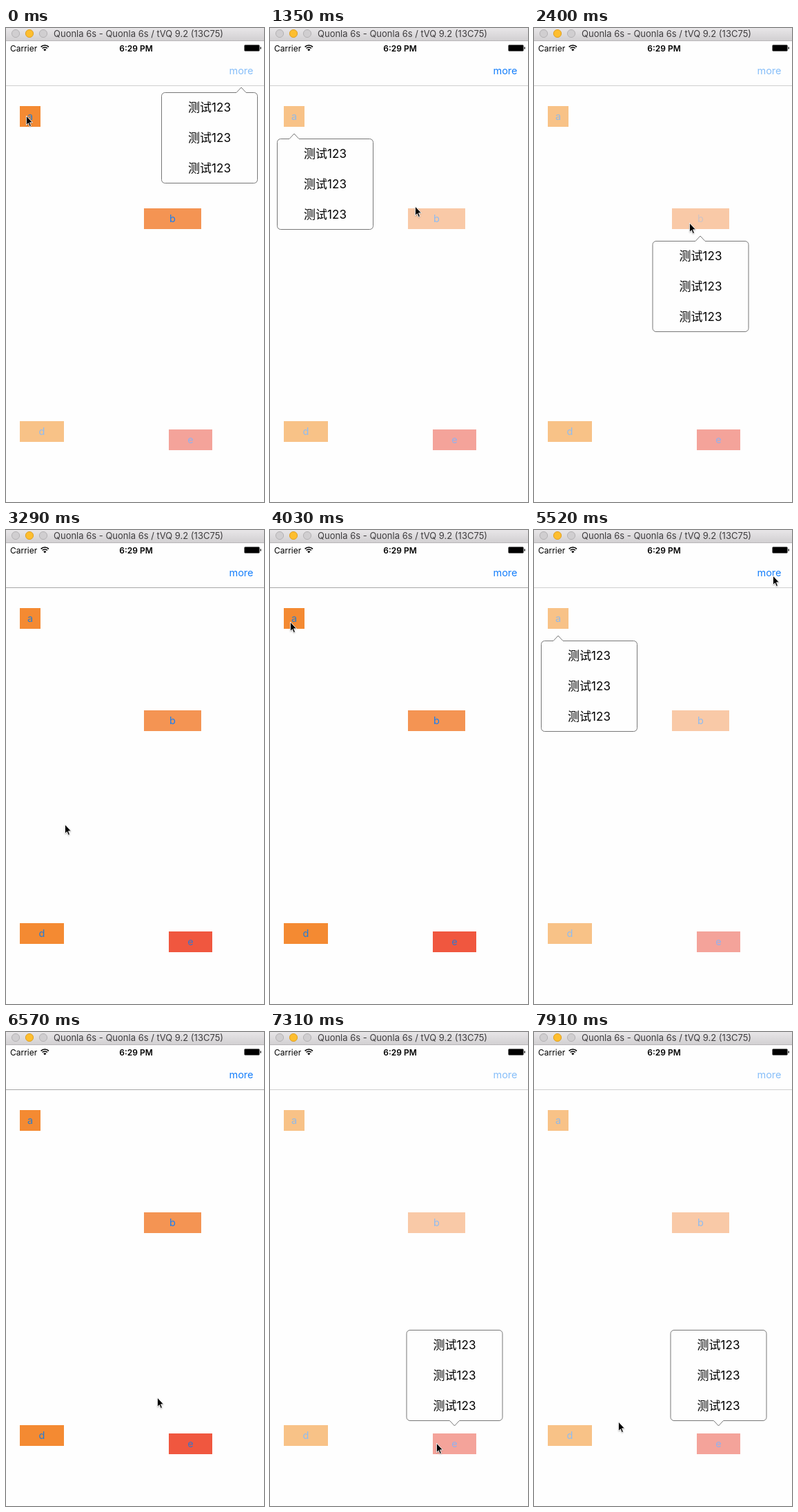
Animation, 374 px wide and 686 px high, one loop 8 s. Source, as an HTML page with a canvas:

```html
<!DOCTYPE html>
<html lang="en">
<head>
<meta charset="utf-8">
<title>Popover menu demo</title>
<style>
  html, body { margin: 0; width: 100%; height: 100%; overflow: hidden; background: #fefefe; }
  canvas { display: block; }
</style>
</head>
<body>
<canvas id="stage" width="374" height="686"></canvas>
<script>
const ctx = document.getElementById('stage').getContext('2d');
const LOOP = 8000;
const SANS = 'Inter, "Noto Sans CJK SC", "Noto Sans CJK", sans-serif';

const buttons = {
  a: { x: 20, y: 113, w: 30, on: '#f48a32', off: '#f8c287', textOn: '#2f7cc8', textOff: '#92b9e6' },
  b: { x: 200, y: 261, w: 83, on: '#f49453', off: '#f9c9a7', textOn: '#167ef5', textOff: '#8fbcf2' },
  d: { x: 20, y: 569, w: 64, on: '#f48a32', off: '#f8c287', textOn: '#227cd8', textOff: '#8fbcf2' },
  e: { x: 236, y: 581, w: 63, on: '#f0573f', off: '#f4a39a', textOn: '#3a74c8', textOff: '#92b1ee' }
};

// Top-left corner of each menu, x of its arrow, and whether it points down.
const menus = {
  more: { x: 225.5, y: 93.5, tip: 341 },
  a: { x: 10.5, y: 160.5, tip: 35 },
  b: { x: 172, y: 308.5, tip: 241 },
  e: { x: 198, y: 431.5, tip: 267.5, down: true }
};

// Start time, open menu, controls shown in full colour, pressed button.
const ALL = ['more', 'a', 'b', 'd', 'e'];
const states = [
  [0, 'more', ['a', 'b']],
  [300, 'a', ['more']],
  [1800, null, ALL],
  [2400, 'b', [], 'b'],
  [2550, 'b', []],
  [3290, null, ALL],
  [4330, 'a', []],
  [5370, 'a', ['more']],
  [5670, 'more', ['a', 'b']],
  [6570, null, ALL],
  [7160, 'e', []]
];

// Pointer moves: first step, last step, destination.
const moves = [
  [0, 0, 29, 127],
  [600, 1200, 200, 232],
  [1350, 1350, 210, 258],
  [2100, 2100, 225, 282],
  [2550, 2990, 85, 426],
  [3590, 4030, 29, 133],
  [4480, 5070, 346, 66],
  [5820, 6270, 219, 529],
  [6860, 7010, 258, 599],
  [7310, 7760, 152, 575],
  [7910, 7910, 122, 564]
];

function pointerAt(t) {
  let [x, y] = moves[0].slice(2);
  for (const [start, end, toX, toY] of moves) {
    if (t < start) break;
    const gaps = Math.round((end - start) / 150);
    const done = gaps ? Math.min(gaps, Math.floor((t - start) / (end - start) * gaps + 1e-6)) : 0;
    const p = (done + 1) / (gaps + 1);
    const eased = p * p * (3 - 2 * p);
    x += (toX - x) * eased;
    y += (toY - y) * eased;
  }
  return [Math.round(x), Math.round(y)];
}

function text(str, x, y, size, color, align = 'center', weight = 400) {
  ctx.font = `${weight} ${size}px ${SANS}`;
  ctx.textAlign = align;
  ctx.fillStyle = color;
  ctx.fillText(str, x, y);
}

function rect(x, y, w, h, color) {
  ctx.fillStyle = color;
  ctx.fillRect(x, y, w, h);
}

function drawTitleBar() {
  const shade = ctx.createLinearGradient(0, 0, 0, 18);
  shade.addColorStop(0, '#e8e6e8');
  shade.addColorStop(1, '#d2d0d2');
  rect(0, 0, 374, 18, shade);
  rect(0, 18, 374, 1, '#b8b6b8');
  [[14, '#d0ced0', '#b4b2b4'], [34, '#fdbe2f', '#dfa023'], [54, '#d0ced0', '#b4b2b4']]
    .forEach(([x, fill, line]) => {
      ctx.beginPath();
      ctx.arc(x, 8, 5.6, 0, Math.PI * 2);
      ctx.fillStyle = fill;
      ctx.fill();
      ctx.lineWidth = 1;
      ctx.strokeStyle = line;
      ctx.stroke();
    });
  text('Quonla 6s - Quonla 6s / tVQ 9.2 (13C75)', 69, 13, 13, '#3e3c3e', 'left');
}

function drawStatusBar() {
  text('Carrier', 6, 34, 12, '#000', 'left');
  text('6:29 PM', 188.5, 34, 12, '#000', 'center', 600);

  ctx.strokeStyle = '#000';
  ctx.lineWidth = 1.7;
  for (const r of [5, 8]) {
    ctx.beginPath();
    ctx.arc(56.3, 33, r, -Math.PI * 0.75, -Math.PI * 0.25);
    ctx.stroke();
  }
  ctx.beginPath();
  ctx.moveTo(56.3, 33.4);
  ctx.arc(56.3, 33.4, 3, -Math.PI * 0.75, -Math.PI * 0.25);
  ctx.fillStyle = '#000';
  ctx.fill();

  ctx.lineWidth = 1;
  ctx.strokeStyle = '#777';
  ctx.beginPath();
  ctx.roundRect(345.5, 24.5, 22, 9, 1.5);
  ctx.stroke();
  rect(346, 25, 21, 8, '#000');
  rect(368.5, 27.5, 1.3, 3, '#000');
}

function drawButton(name, lit, pressed) {
  const { x, y, w, on, off, textOn, textOff } = buttons[name];
  rect(x, y, w, 30, lit ? on : off);
  ctx.globalAlpha = pressed ? 0.4 : 1;
  text(name, x + w / 2, y + 20, 14.5, lit ? textOn : textOff);
  ctx.globalAlpha = 1;
}

function drawMenu({ x, y, tip, down }) {
  const w = 139, h = 131, r = 5, right = x + w, bottom = y + h;
  ctx.beginPath();
  ctx.moveTo(x + r, y);
  if (!down) {
    ctx.lineTo(tip - 7, y);
    ctx.lineTo(tip, y - 7.5);
    ctx.lineTo(tip + 7, y);
  }
  ctx.arcTo(right, y, right, bottom, r);
  ctx.arcTo(right, bottom, x, bottom, r);
  if (down) {
    ctx.lineTo(tip + 7, bottom);
    ctx.lineTo(tip, bottom + 7.5);
    ctx.lineTo(tip - 7, bottom);
  }
  ctx.arcTo(x, bottom, x, y, r);
  ctx.arcTo(x, y, right, y, r);
  ctx.closePath();
  ctx.fillStyle = '#fefefe';
  ctx.fill();
  ctx.lineWidth = 1;
  ctx.strokeStyle = '#777';
  ctx.stroke();
  for (let row = 0; row < 3; row++) {
    text('测试123', x + w / 2, y + 27 + row * 44, 17, '#000');
  }
}

function drawPointer([x, y]) {
  ctx.save();
  ctx.translate(x, y);
  ctx.scale(0.88, 0.94);
  ctx.beginPath();
  [[0.5, 0], [0.5, 14.5], [3.8, 11.4], [6, 16.6], [8.5, 15.5], [6.3, 10.5], [10.8, 10.5]]
    .forEach(([px, py]) => ctx.lineTo(px, py));
  ctx.closePath();
  ctx.shadowColor = 'rgba(0,0,0,.4)';
  ctx.shadowBlur = 2;
  ctx.shadowOffsetY = 1;
  ctx.fillStyle = '#000';
  ctx.fill();
  ctx.shadowColor = 'transparent';
  ctx.lineWidth = 1;
  ctx.strokeStyle = '#fff';
  ctx.stroke();
  ctx.restore();
}

function draw(t) {
  const [, open, lit, pressed] = states.findLast(([start]) => start <= t);
  rect(0, 0, 374, 686, '#fefefe');
  drawTitleBar();
  drawStatusBar();
  rect(0, 83, 374, 1, open ? '#cfcfcf' : '#a8a8a8');
  text('more', 358.5, 67, 14.5, lit.includes('more') ? '#147efb' : '#86bef9', 'right');
  Object.keys(buttons).forEach(name => drawButton(name, lit.includes(name), name === pressed));
  if (open) drawMenu(menus[open]);
  drawPointer(pointerAt(t));
}

const began = performance.now();
function tick() {
  draw((performance.now() - began) % LOOP);
  requestAnimationFrame(tick);
}
tick();
</script>
</body>
</html>
```
